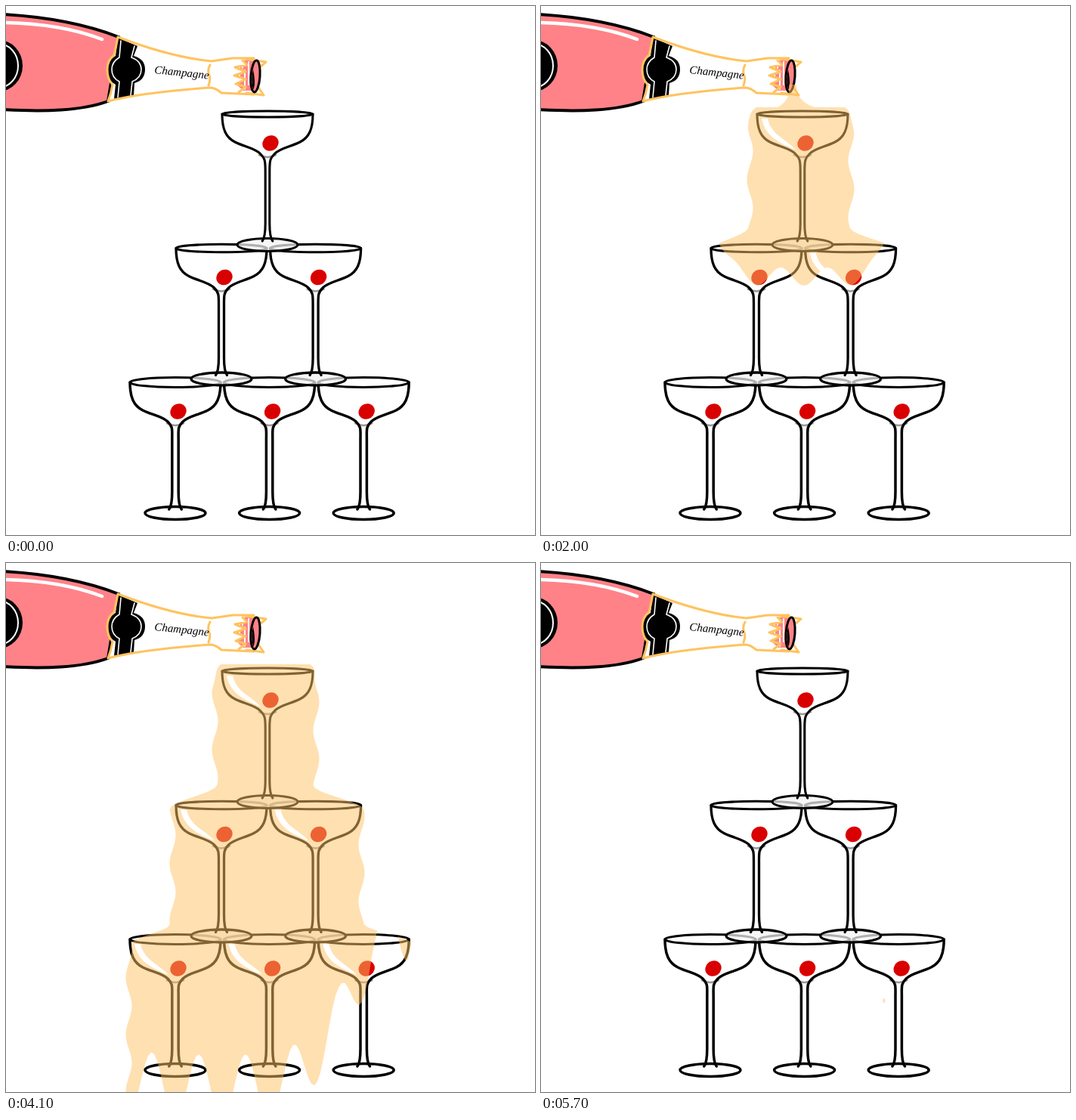
Write an HTML page that moves like this. It is 700 by 700 pixels and loops after 5800 ms.

```html
<!DOCTYPE html>
<html lang="en">
<head>
<meta charset="utf-8">
<title>Champagne tower</title>
<style>
html, body { margin: 0; width: 100%; height: 100%; overflow: hidden; background: #fff; }
svg { display: block; width: 100vw; height: 100vh; }
.line { fill: none; stroke: #000; stroke-linecap: round; stroke-linejoin: round; }
.gold { fill: none; stroke: #ffc35f; stroke-width: 3; stroke-linecap: round; stroke-linejoin: round; }
.white { fill: none; stroke: #fff; stroke-linecap: round; }
text { font: italic 15px 'Liberation Serif', serif; }
</style>
</head>
<body>
<svg viewBox="0 0 700 700">
  <defs>
    <clipPath id="frontClip"><path id="front"/></clipPath>
    <clipPath id="levelClip"><rect id="level" x="270" width="150" height="120"/></clipPath>
    <mask id="drain" maskUnits="userSpaceOnUse" x="0" y="0" width="700" height="700">
      <rect width="700" height="700" fill="#fff"/>
      <path id="edge" fill="none" stroke="#000"/>
      <path id="gaps" stroke="#000"/>
    </mask>
  </defs>

  <g id="bottle">
    <path d="M-6 11C50 14 105 24 149 41L135 126C100 139 50 140 -6 137Z" fill="#ff8288" stroke="#000" stroke-width="4"/>
    <path class="white" d="M0 22C45 23 90 30 127 44" stroke-width="4.5"/>
    <ellipse cx="-10" cy="79" rx="32" ry="34"/>
    <ellipse class="white" cx="-10" cy="79" rx="26" ry="29" stroke-width="2"/>
    <path d="M148 41C190 57 230 69 272 73L328 69L328 117L285 115Q277 108 270 108C215 112 170 117 135 126Q145 105 134 84Q144 65 148 41Z" fill="#fff"/>
    <path d="M148 42L174 53L169 66Q184 70 184 84Q184 98 170 102L169 118L143 123L145 104Q134 98 134 84Q134 71 145 66Z"/>
    <path class="white" d="M152 46L150 68Q140 74 140 84Q140 95 150 100L148 121M170 53L166 68Q179 73 179 84Q179 95 167 100L165 118" stroke-width="1.6"/>
    <path class="gold" d="M148 41C190 57 230 69 272 73L300 69L328 69M148 41Q145 57 143 65Q134 72 134 84Q134 97 141 104Q139 116 135 126C170 117 215 112 270 108Q277 108 285 115L328 117M270 78Q266 85 269 92Q271 97 268 105"/>
    <path d="M314 72H329V112H314L304 103L316 97L302 92L316 87L303 81L319 78Z" fill="#ff8288"/>
    <path class="white" d="M313 74V82M309 80V96M316 85V110M321 74V104" stroke-width="2"/>
    <path class="gold" d="M316 70L344 74L336 81M313 72L319 78L303 81L317 87L302 92L317 97L304 103L317 107L308 114M334 108L341 118L318 115" stroke-width="2.4"/>
    <ellipse cx="330" cy="93" rx="6" ry="21" transform="rotate(4 330 93)" fill="#ff8288" stroke="#000" stroke-width="3"/>
    <path d="M327 84Q324 98 327 111Q331 104 327 84Z"/>
    <text transform="translate(196 89) rotate(6)">Champagne</text>
  </g>

  <g id="glasses"></g>
  <g id="liquid" fill="#ffc366" opacity=".5" mask="url(#drain)">
    <path id="flow" clip-path="url(#frontClip)"/>
    <g clip-path="url(#levelClip)"><path id="bowlFill"/></g>
    <path id="stream"/>
  </g>
  <ellipse id="speck" cx="454" cy="579" rx="1.6" ry="3" fill="#ffc366" opacity=".5"/>
  <g id="shines" fill="#fff"></g>
</svg>

<script>
const $ = id => document.getElementById(id);
const set = (el, attrs) => { for (const k in attrs) el.setAttribute(k, attrs[k]); };
const add = (parent, tag, attrs) => {
  const el = document.createElementNS('http://www.w3.org/2000/svg', tag);
  set(el, attrs);
  return parent.appendChild(el);
};
const clamp = v => Math.max(0, Math.min(1, v));
const span = (t, a, b) => clamp((t - a) / (b - a));
const mix = (a, b, u) => a + (b - a) * u;
const ease = u => u * u * (3 - 2 * u);
const polygon = points => 'M' + points.map(p => p.join(' ')).join('L') + 'Z';

const LOOP = 5800, STEP = 100;
const POUR = 100, OVERFLOW = 700, DRAIN = 4200, BREAK_UP = 4900;
const HALF_RIM = 60, FOOT_DROP = 173;

// Lower rows come first so that the feet cover the rims below
const glasses = [];
for (let row = 2; row >= 0; row--) {
  for (let i = 0; i <= row; i++) {
    glasses.push({ row, i, x: 346 + (i - row / 2) * 124.6 + row * 1.3, y: 143 + row * 177.5 });
  }
}

const wall = side =>
  `M${side * 60} 0C${side * 60} 20 ${side * 55} 31 ${side * 43} 37S${side * 17} 45 ${side * 10} 52`;

function drawGlass(g) {
  const at = { transform: `translate(${g.x} ${g.y})` };
  const box = add($('glasses'), 'g', { ...at, class: 'line', 'stroke-width': 3.1 + g.row * .2 });
  add(box, 'ellipse', {
    cy: FOOT_DROP, rx: 40, ry: 8.5, style: `fill:${g.row < 2 ? 'rgba(243,243,243,.72)' : '#fff'}`
  });
  add(box, 'path', { d: 'M-11 54Q0 60 11 54', style: 'stroke:#999', 'stroke-width': 2.6 });
  add(box, 'ellipse', { rx: HALF_RIM, ry: 4 + g.row * 1.2, 'stroke-width': 3 });
  for (const side of [-1, 1]) {
    const x = side * (2.8 + g.row * .7);
    add(box, 'path', {
      d: wall(side) + `S${x} 62 ${x} 76V145C${x} 158 ${x + side} 164 ${x + side * 4} 168`
    });
  }
  g.cherry = add($('glasses'), 'ellipse', { rx: 11, ry: 10, fill: '#d90000' });
  add($('shines'), 'path', { ...at, d: 'M-54 6C-50 25 -38 36 -9 47C-24 31 -41 28 -46 6Z' });
}
glasses.forEach(drawGlass);
set($('bowlFill'), { d: wall(-1) + 'L10 52C17 45 33 42 43 37C55 31 60 20 60 0Z', transform: 'translate(346 143)' });

// The poured sheet widens by one shoulder per row of glasses
function flowPath(t) {
  const left = [], right = [];
  for (let y = 134; y < 780; y += 4) {
    const second = ease(span(y, 294, 326)), third = ease(span(y, 478, 504));
    const middle = 343.5 + second * 2 + third * 4;
    const half = 67 + second * 58 + third * 62 - 8 * Math.exp((134 - y) / 5);
    const calm = span(y, 134, 170) * 4;
    left.push([middle - half + calm * Math.sin(y / 12 - t / 150 - 1.1), y]);
    right.unshift([middle + half + calm * Math.sin(y / 12 - t / 150 + 1), y]);
  }
  return polygon([...left, ...right]);
}

// Lowest point of the falling front: [time, y]
const fallKeys = [[OVERFLOW, 130], [1300, 225], [2000, 370], [2400, 420], [3000, 545], [3300, 551], [3600, 650], [4100, 740], [4300, 900]];
function fall(t) {
  const next = Math.max(1, fallKeys.findIndex(key => key[0] > t));
  if (t >= fallKeys.at(-1)[0]) return fallKeys.at(-1)[1];
  const [t0, y0] = fallKeys[next - 1], [t1, y1] = fallKeys[next];
  return mix(y0, y1, span(t, t0, t1));
}

// Drips hang at even spacing, the ends curl up, and the right side lags near the floor
function frontPath(t) {
  const points = [[140, 0]];
  const half = 66 + Math.max(0, t - 1300) * .047;
  const depth = 12 * span(t, 1300, 2000) + 33 * span(t, 3300, 4000);
  for (let x = 140; x <= 560; x += 4) {
    const lag = Math.max(0, x - 370) * 7 * span(t, 3300, 4000) * (1 - span(t, 4100, 4300));
    const ripple = depth * (1 - Math.cos((x - 348) / 62 * 2 * Math.PI));
    points.push([x, Math.max(0, fall(t - lag) - ripple - 20 * ((x - 346) / half) ** 8)]);
  }
  return polygon([...points, [560, 0]]);
}

const drop = (x, top, bottom, w) =>
  `M${x} ${top}C${x + w} ${top} ${x + w * 1.7} ${bottom} ${x} ${bottom}` +
  `C${x - w * 1.7} ${bottom} ${x - w} ${top} ${x} ${top}Z`;

// Gaps open beside each stem, and between the glasses
function gapPath(t) {
  const grow = span(t, DRAIN, BREAK_UP);
  if (!grow) return '';
  return glasses.map(({ row, i, x, y }) => {
    const gap = (dx, from, to, w) =>
      drop(x + dx, y + from, y + mix(from, to, Math.sqrt(grow)), w * grow);
    if (row === 2) {
      return gap(-62, 4, 420, 30) + gap(62, 4, 420, 30) + gap(-2, 14, 174 - i * 75, 20 - i * 6);
    }
    return gap(-62, 8, 172, 13) + gap(62, 8, 172, 15) + gap(-28, 12, 172, 15) + gap(23, 8, 172, 17);
  }).join('');
}

function streamPath(t) {
  if (t < POUR || t >= 4000) return '';
  if (t < OVERFLOW) {
    const tip = mix(116, 192, span(t, 100, 400));
    return `M327 101L338 103Q345 118 346 ${tip - 8}Q340 ${tip + 8} 333 ${tip - 8}Q333 118 327 101Z`;
  }
  const top = mix(104, 131, span(t, 3500, 4000));
  const waist = Math.max(top, 120);
  return `M328 ${top}L338 ${top}C339 ${waist} 345 128 362 134V138H308V136C323 131 330 ${waist} 328 ${top}Z`;
}

const bobStart = [300, 2050, 2900];

function render(t) {
  const flow = flowPath(t);
  const erosion = Math.max(0, t - BREAK_UP) / 12;
  set($('flow'), { d: flow });
  set($('front'), { d: frontPath(t) });
  set($('stream'), { d: streamPath(t) });
  set($('level'), { y: mix(198, 140, span(t, 200, 750)) });
  set($('edge'), { d: erosion ? flow : '', 'stroke-width': erosion });
  set($('gaps'), { d: gapPath(t), 'stroke-width': erosion });
  set($('liquid'), { display: t >= POUR && t < 5700 ? 'inline' : 'none' });
  set($('speck'), { display: t >= 5600 ? 'inline' : 'none' });
  for (const { row, x, y, cherry } of glasses) {
    const lift = Math.sin(Math.PI * span(t, bobStart[row], bobStart[row] + 900));
    set(cherry, { transform: `translate(${x + 4 - 5 * lift} ${y + 38.5 - 8 * lift}) rotate(-35)` });
  }
}

const start = performance.now();
function tick() {
  const now = (performance.now() - start) % LOOP;
  render(Math.floor(now / STEP) * STEP);
  requestAnimationFrame(tick);
}
tick();
</script>
</body>
</html>
```
